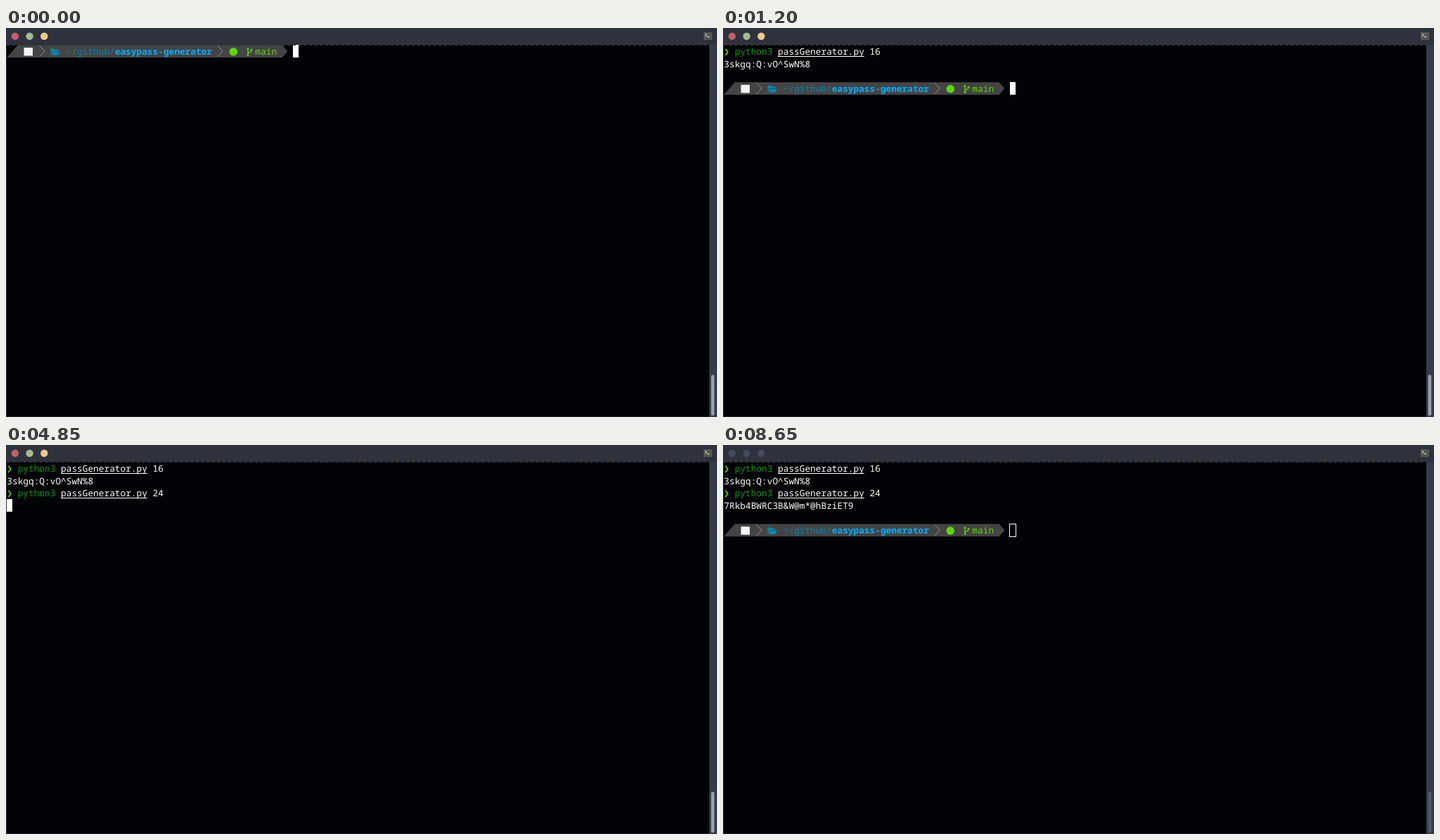
An HTML page with a canvas for the animation above (8.7 s loop, 1011 px wide and 554 px high).

```html
<!DOCTYPE html>
<html lang="en">
<head>
<meta charset="utf-8">
<title>Password generator in a terminal</title>
<style>
  html, body { margin: 0; width: 100%; height: 100%; overflow: hidden; background: #020306; }
  canvas { display: block; }
</style>
</head>
<body>
<canvas id="stage" width="1011" height="554"></canvas>
<script>
const ctx = document.getElementById('stage').getContext('2d');
const LOOP = 8700;
const CELL_W = 7.675, CELL_H = 17.65, LEFT = 1.3, TOP = 24.3;
const FONT = '12.79px "Noto Sans Mono", "DejaVu Sans Mono", monospace';
const INPUT_COL = 53;
const BLUE = '#0087af', SKY = '#00afff', LIME = '#5fd700', GREEN = '#0a990a', WHITE = '#fff';

const colX = col => LEFT + col * CELL_W;
const rowY = row => TOP + row * CELL_H;

function rect(x, y, w, h, color) {
  ctx.fillStyle = color;
  ctx.fillRect(x, y, w, h);
}

function disc(x, y, r, color) {
  ctx.fillStyle = color;
  ctx.beginPath();
  ctx.arc(x, y, r, 0, 2 * Math.PI);
  ctx.fill();
}

function polygon(points, color) {
  ctx.fillStyle = color;
  ctx.beginPath();
  points.forEach(([x, y]) => ctx.lineTo(x, y));
  ctx.closePath();
  ctx.fill();
}

function polyline(points, color, width) {
  ctx.strokeStyle = color;
  ctx.lineWidth = width;
  ctx.beginPath();
  points.forEach(([x, y]) => ctx.lineTo(x, y));
  ctx.stroke();
}

// Each character sits in its own terminal cell.
function print(text, col, row, color, weight = '') {
  ctx.font = `${weight} ${FONT}`;
  ctx.textRendering = 'geometricPrecision';
  ctx.fillStyle = color;
  [...text].forEach((char, i) => ctx.fillText(char, colX(col + i), rowY(row) + 13.7));
}

function command(col, row, argument) {
  const script = 'passGenerator.py';
  print('python3', col, row, GREEN);
  print(script, col + 8, row, WHITE);
  rect(colX(col + 8), Math.round(rowY(row) + 15.2), script.length * CELL_W, 1, WHITE);
  print(argument, col + 25, row, WHITE);
}

function finishedCommand(row, argument) {
  print('❯', 0, row, LIME);
  command(2, row, argument);
}

function separator(col, y) {
  const x = colX(col);
  polyline([[x + .3, y + 1], [x + CELL_W, y + CELL_H / 2], [x + .3, y + CELL_H - 1]], '#949494', 1);
}

function folder(x, y) {
  polygon([[x, y + 9], [x, y + 1], [x + 1, y], [x + 4, y], [x + 5.5, y + 1.5], [x + 10, y + 1.5],
    [x + 11, y + 2.5], [x + 11, y + 4], [x + 3, y + 4], [x + .7, y + 8]], BLUE);
  polygon([[x + 3.4, y + 4.8], [x + 13.6, y + 4.8], [x + 10.8, y + 9.8], [x + .6, y + 9.8]], BLUE);
}

function branch(x, y) {
  ctx.strokeStyle = LIME;
  ctx.lineWidth = 1.3;
  ctx.beginPath();
  ctx.moveTo(x, y);
  ctx.lineTo(x, y + 9);
  ctx.moveTo(x + 5, y + 2);
  ctx.quadraticCurveTo(x + 5, y + 4.8, x + 2.5, y + 5);
  ctx.quadraticCurveTo(x, y + 5.2, x, y + 8);
  ctx.stroke();
  [[0, 0], [0, 9], [5, 1.5]].forEach(([dx, dy]) => disc(x + dx, y + dy, 1.4, LIME));
}

function prompt(row) {
  const y = rowY(row), bottom = y + CELL_H;
  polygon([[colX(0), bottom], [colX(2), y], [colX(51), y],
    [colX(52), y + CELL_H / 2], [colX(51), bottom]], '#444');
  rect(25.5, y + 3.7, 12.5, 11.5, '#f4f4f4');
  separator(6, y);
  folder(63.5, y + 4.6);
  print('~/github/', 11, row, BLUE);
  print('easypass-generator', 20, row, SKY, 'bold');
  separator(39, y);
  disc(323.3, y + 9.5, 5.8, LIME);
  branch(344, y + 5.3);
  print('main', 46, row, LIME);
}

function cursor(col, row, focused) {
  const x = Math.round(colX(col)), y = Math.round(rowY(row));
  if (focused) return rect(x, y, 8, 18, WHITE);
  ctx.strokeStyle = WHITE;
  ctx.lineWidth = 1;
  ctx.strokeRect(x - .5, y - .5, 9, 18);
}

function windowFrame(t, focused) {
  rect(0, 0, 1011, 24, '#2d323d');
  rect(0, 24, 1, 530, '#2d323d');
  rect(1000, 24, 11, 530, '#353b48');
  rect(1, 553, 999, 1, '#1b1f27');
  for (let x = 1.5; x < 1000; x += CELL_W) rect(x, 24, CELL_W / 2, 1, '#343944');

  ['#bf616a', '#a3be8c', '#ebcb8b'].forEach((color, i) =>
    disc(12.9 + i * 20.7, 11.7, 5.2, focused ? color : '#434a59'));
  // Minimise sign fades in under the pointer.
  if (focused && t >= 8150) rect(51, 11, 7, 1, `rgba(46,52,64,${t < 8250 ? .4 : .8})`);

  rect(992, 6, 12, 11, '#555753');
  polyline([[994, 8], [996.3, 10], [994, 12]], '#eee', 1);
  rect(997, 12, 3, 1, '#eee');

  ctx.fillStyle = focused ? '#9a9fa9' : '#535a68';
  ctx.beginPath();
  ctx.roundRect(1002.6, 494, 4.6, 58, 2.3);
  ctx.fill();
}

function editedArgument(t) {
  if (t < 4000) return '16';
  if (t < 4150) return '1';
  if (t < 4300) return '';
  return t < 4550 ? '2' : '24';
}

function promptLine(row, argument, focused) {
  prompt(row);
  if (argument === null) return cursor(INPUT_COL, row, focused);
  command(INPUT_COL, row, argument);
  cursor(INPUT_COL + 25 + argument.length, row, focused);
}

function session(t, focused) {
  if (t < 1150) return promptLine(0, t < 600 ? null : '16', focused);
  finishedCommand(0, '16');
  if (t < 1200) return cursor(0, 1, focused);
  print('3skgq:Q:vO^SwN%8', 0, 1, WHITE);
  if (t < 4850) return promptLine(3, t < 3400 ? null : editedArgument(t), focused);
  finishedCommand(2, '24');
  if (t < 4950) return cursor(0, 3, focused);
  print('7Rkb4BWRC3B&W@m*@hBziET9', 0, 3, WHITE);
  promptLine(5, null, focused);
}

function draw(now) {
  const t = now % LOOP;
  const focused = t < 8650;
  rect(0, 0, 1011, 554, '#020306');
  session(t, focused);
  windowFrame(t, focused);
  requestAnimationFrame(draw);
}

requestAnimationFrame(draw);
</script>
</body>
</html>
```
